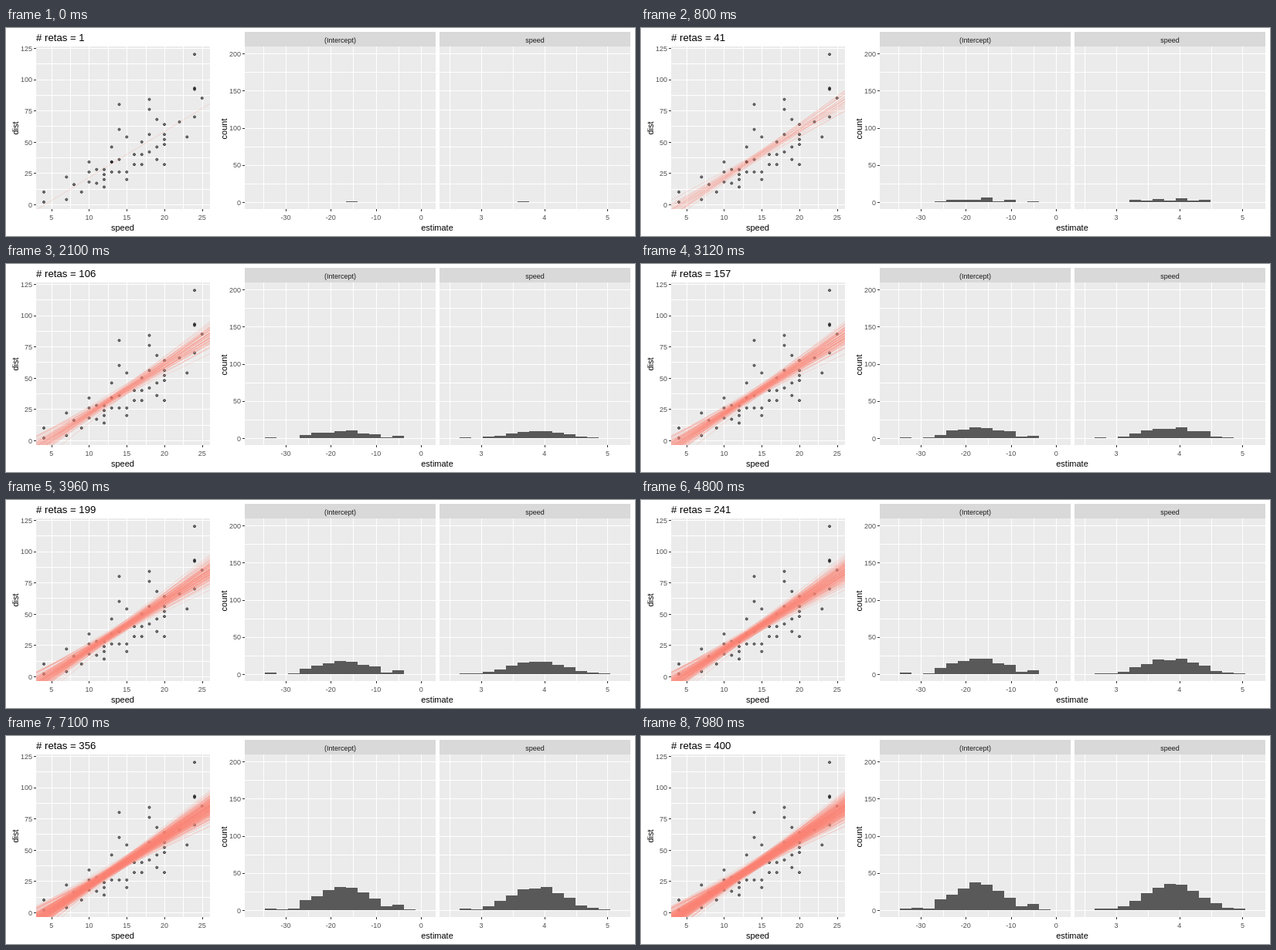
These frames come from a looping animation (814x270 px, 8 s). An HTML page:

```html
<!DOCTYPE html>
<html lang="pt">
<head>
<meta charset="utf-8">
<title>Retas e estimativas</title>
<style>
  html, body { margin: 0; width: 100%; height: 100%; overflow: hidden; background: #fff; }
  svg { display: block; width: 814px; height: 270px; font-family: "Liberation Sans", Arial, sans-serif; }
  .grid, .ticks, .bars { shape-rendering: crispEdges; }
  .grid { stroke: #fff; }
  .ticks { stroke: #333; }
  .tick { font-size: 9px; fill: #4d4d4d; }
  .strip { font-size: 9px; fill: #1a1a1a; }
  .axis { font-size: 11px; }
  .title { font-size: 13.2px; }
  .mid { text-anchor: middle; }
  .end { text-anchor: end; }
  .dot { fill: rgba(0, 0, 0, .45); stroke: rgba(0, 0, 0, .65); }
  .fit { stroke: #fa8072; stroke-opacity: .2; stroke-width: 1.07; }
  .bars { fill: #595959; }
</style>
</head>
<body>
<svg id="stage" viewBox="0 0 814 270">
  <defs><clipPath id="plot"><rect x="39" y="24" width="225" height="211"/></clipPath></defs>
</svg>
<script>
const STEP = 20, TOTAL = 400;
const TOP = 24, BOTTOM = 235, BINS = 15, BIN = 14.97;
const stage = document.getElementById('stage');

function add(tag, attrs, parent = stage) {
  const el = document.createElementNS('http://www.w3.org/2000/svg', tag);
  for (const key in attrs) el.setAttribute(key, attrs[key]);
  parent.appendChild(el);
  return el;
}

function label(text, x, y, cls, extra = {}) {
  const el = add('text', { x, y, class: cls, ...extra });
  el.textContent = text;
  return el;
}

const range = (from, to, by) =>
  Array.from({ length: Math.round((to - from) / by) + 1 }, (_, i) => from + i * by);
const crisp = v => Math.floor(v + .4) + .5;

// Grey panel with white grid, ticks and tick labels.
function panel(left, width, xs, ys, xMajor, xMinor, yMajor, yMinor, showY) {
  const right = left + width;
  add('rect', { x: left, y: TOP, width, height: BOTTOM - TOP, fill: '#ebebeb' });
  const across = v => `M${left} ${crisp(ys(v))}H${right}`;
  const down = v => `M${crisp(xs(v))} ${TOP}V${BOTTOM}`;
  const grid = [...yMajor, ...yMinor].map(across).concat([...xMajor, ...xMinor].map(down));
  add('path', { d: grid.join(''), class: 'grid' });
  let ticks = '';
  for (const v of xMajor) {
    ticks += `M${crisp(xs(v))} ${BOTTOM}v3`;
    label(v, xs(v), 248.5, 'tick mid');
  }
  if (showY) for (const v of yMajor) {
    ticks += `M${left - 3} ${crisp(ys(v))}h3`;
    label(v, left - 5, ys(v) + 3.6, 'tick end');
  }
  add('path', { d: ticks, class: 'ticks' });
}

function strip(text, left) {
  add('rect', { x: left, y: 5, width: 247, height: 19, fill: '#d9d9d9' });
  label(text, left + 123.5, 19, 'strip mid');
}

const speedX = v => 10 + 9.75 * v;
const distY = v => 229.15 - 1.625 * v;
const interceptX = v => 537.15 + 5.84 * v;
const slopeX = v => 369.98 + 81.7 * v;
const countY = v => 226 - .963 * v;

panel(39, 225, speedX, distY, range(5, 25, 5), range(7.5, 22.5, 5),
  range(0, 125, 25), range(12.5, 112.5, 25), true);
const counts = [range(0, 200, 50), range(25, 175, 50)];
panel(309, 247, interceptX, countY, range(-30, 0, 10), range(-35, -5, 10), ...counts, true);
panel(561, 247, slopeX, countY, range(3, 5, 1), range(2.5, 4.5, 1), ...counts, false);
strip('(Intercept)', 309);
strip('speed', 561);

label('speed', 151, 263, 'axis mid');
label('estimate', 558, 263, 'axis mid');
label('dist', 0, 0, 'axis mid', { transform: 'translate(15.5 130) rotate(-90)' });
label('count', 0, 0, 'axis mid', { transform: 'translate(286 131) rotate(-90)' });
const title = label('', 39, 17, 'title');

// The plotted observations: stopping distances by speed.
const distances = {
  4: [2, 10], 7: [4, 22], 8: [16], 9: [10], 10: [18, 26, 34], 11: [17, 28],
  12: [14, 20, 24, 28], 13: [26, 34, 34, 46], 14: [26, 36, 60, 80], 15: [20, 26, 54],
  16: [32, 40], 17: [32, 40, 50], 18: [42, 56, 76, 84], 19: [36, 46, 68],
  20: [32, 48, 52, 56, 64], 22: [66], 23: [54], 24: [70, 92, 93, 120], 25: [85]
};
for (const speed in distances)
  for (const dist of distances[speed])
    add('circle', { cx: speedX(+speed), cy: distY(dist), r: 1.5, class: 'dot' });

// Evenly spread, correlated normal draws of intercept and slope.
const spread = (start, step, i) => (start + step * i) % 1;
const normal = u => (u ** .135 - (1 - u) ** .135) / .1975;

function estimate(i) {
  const a = normal(spread(.3, .75488, i));
  const b = normal(spread(.35, .56984, i));
  return { slope: 3.89 + .407 * a, intercept: -17.24 + 5.6 * (.34 * b - .94 * a) };
}

// Two coefficients are listed per fit, so every second step adds one.
const fitsAt = n => Math.ceil(n / 2);
const estimates = Array.from({ length: fitsAt(TOTAL) }, (_, i) => estimate(i));

const fitLayer = add('g', { 'clip-path': 'url(#plot)' });
const lines = estimates.map(({ slope, intercept }) => {
  const at = v => distY(intercept + slope * v);
  return add('line', {
    x1: speedX(2.9), y1: at(2.9), x2: speedX(26.1), y2: at(26.1), class: 'fit'
  }, fitLayer);
});

const interceptBars = add('path', { class: 'bars' });
const slopeBars = add('path', { class: 'bars' });

function drawBars(el, left, positions) {
  const tally = Array(BINS).fill(0);
  for (const x of positions) {
    const bin = Math.floor((x - left) / BIN);
    tally[Math.min(BINS - 1, Math.max(0, bin))]++;
  }
  const bar = (count, i) => {
    const x = left + i * BIN;
    return count ? `M${x} ${countY(0)}V${countY(count)}H${x + BIN}V${countY(0)}Z` : '';
  };
  el.setAttribute('d', tally.map(bar).join(''));
}

let shown = 0;
function show(n) {
  if (n === shown) return;
  shown = n;
  title.textContent = `# retas = ${n}`;
  const drawn = estimates.slice(0, fitsAt(n));
  lines.forEach((line, i) => { line.style.display = i < drawn.length ? '' : 'none'; });
  drawBars(interceptBars, 320.2, drawn.map(e => interceptX(e.intercept)));
  drawBars(slopeBars, 572.2, drawn.map(e => slopeX(e.slope)));
}

let start;
function frame(now) {
  start ??= now;
  show(Math.floor(Math.max(0, now - start) / STEP + 1e-6) % TOTAL + 1);
  requestAnimationFrame(frame);
}
show(1);
requestAnimationFrame(frame);
</script>
</body>
</html>
```
